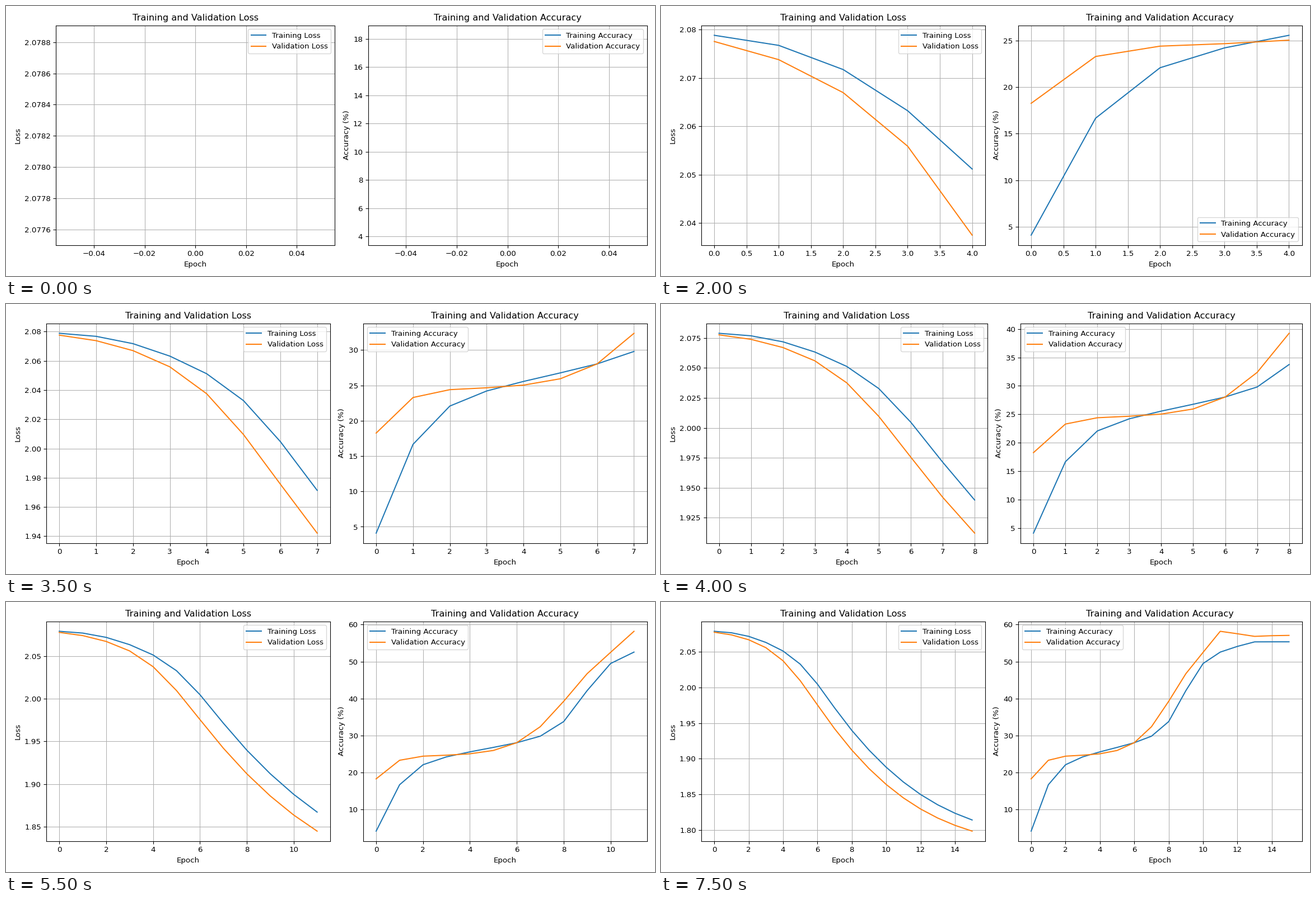
A matplotlib script for the animation above (8 s loop, 1159 by 483 pixels).

```python
import numpy as np
import matplotlib.pyplot as plt
from matplotlib.animation import FuncAnimation

WIDTH, HEIGHT, DPI = 1159, 483, 96.6
EPOCHS = 16
LAYOUT = dict(left=0.125, right=0.9, bottom=0.11, top=0.88, wspace=0.2)

epoch = np.arange(EPOCHS)


def bump(height, center, width):
    return height * np.exp(-((epoch - center) / width) ** 2)


def sigmoid(height, center, rate):
    return height / (1 + np.exp(-rate * (epoch - center)))


def loss_curve(drop, start, rate, lag):
    """Gompertz decay whose onset is delayed by a small lag."""
    return 2.07955 - drop * np.exp(-np.exp(start - rate * epoch + lag))


train_loss = loss_curve(0.30, 1.80, 0.260, bump(0.12, 4.9, 2.0))
val_loss = loss_curve(0.31, 1.607, 0.262, bump(0.135, 3.7, 2.4))

# Quick first gain, plateau, then a second rise that levels off
train_acc = (4.1 + 16.9 * np.tanh(0.82 * epoch) + 1.15 * np.minimum(epoch, 13)
             + sigmoid(19.4, 8.87, 1.72))
val_acc = (18.24 + 6.2 * np.tanh(1.12 * epoch)
           + sigmoid(32.7, 8.2, 0.95) + bump(3.4, 11.2, 0.8))

# The hundredth of a pixel guards against rounding down
fig, (loss_ax, acc_ax) = plt.subplots(
    1, 2, figsize=((WIDTH + 0.01) / DPI, (HEIGHT + 0.01) / DPI), dpi=DPI)


def plot_history(ax, metric, unit, train, val, count):
    ax.clear()
    ax.plot(epoch[:count], train[:count], label=f"Training {metric}")
    ax.plot(epoch[:count], val[:count], label=f"Validation {metric}")
    ax.set_title(f"Training and Validation {metric}")
    ax.set_xlabel("Epoch")
    ax.set_ylabel(metric + unit)
    ax.legend()
    ax.grid(True)


def update(i):
    plot_history(loss_ax, "Loss", "", train_loss, val_loss, i + 1)
    plot_history(acc_ax, "Accuracy", " (%)", train_acc, val_acc, i + 1)
    # Start from the same margins each time so every loop lays out alike
    fig.subplots_adjust(**LAYOUT)
    fig.tight_layout()
    return []


anim = FuncAnimation(fig, update, frames=EPOCHS, interval=500,
                     repeat=True, repeat_delay=0, blit=False)

plt.show()
```
